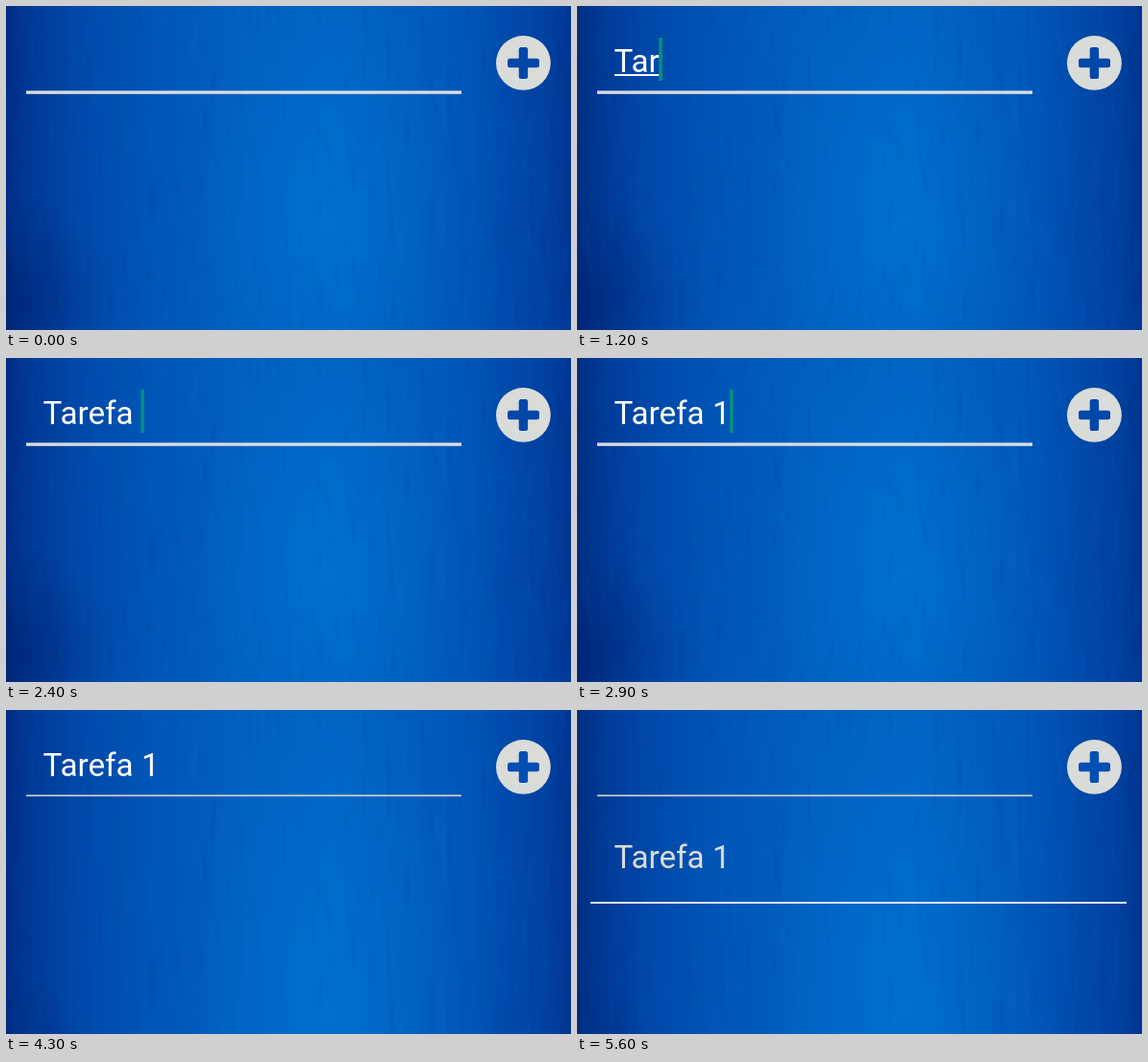
Write an HTML page with a canvas that moves like this. It is 588 px wide and 338 px high and loops after 5.7 s.

```html
<!DOCTYPE html>
<html lang="pt">
<head>
<meta charset="utf-8">
<style>
html, body { margin: 0; width: 588px; height: 338px; overflow: hidden; background: #0058b8; }
canvas { display: block; }
</style>
</head>
<body>
<canvas id="stage" width="588" height="338"></canvas>
<script>
const W = 588, H = 338, LOOP = 5700;
const FOCUS = 300, BLUR = 3400, ADD = 4500;
const TASK = 'Tarefa 1', TEXT_X = 38.5;
const KEYS = [700, 900, 1100, 1500, 1700, 1900, 2300, 2700];
const ctx = document.getElementById('stage').getContext('2d');

function seeded(seed) {
  return () => (seed = (seed * 16807) % 2147483647) / 2147483647;
}

// Brushed blue wall; `stretch` is its vertical scale.
function makeWall(stretch) {
  const canvas = document.createElement('canvas');
  canvas.width = W;
  canvas.height = H;
  const c = canvas.getContext('2d');
  c.scale(1, stretch);

  const base = c.createLinearGradient(0, 0, W, 0);
  [[0, '#002d80'], [.03, '#003692'], [.12, '#0048a8'], [.26, '#0056b7'],
   [.42, '#0060c0'], [.6, '#0064c3'], [.72, '#005dbd'], [.82, '#0056b7'],
   [.89, '#004aaa'], [.95, '#0042a1'], [1, '#003590']].forEach(([p, color]) => base.addColorStop(p, color));
  c.fillStyle = base;
  c.fillRect(0, 0, W, H);

  c.save();
  c.translate(335, 215);
  c.scale(1, 1.7);
  const glow = c.createRadialGradient(0, 0, 0, 0, 0, 140);
  glow.addColorStop(0, 'rgba(0,122,216,.5)');
  glow.addColorStop(1, 'rgba(0,122,216,0)');
  c.fillStyle = glow;
  c.fillRect(-W, -H, 2 * W, 2 * H);
  c.restore();

  const corner = c.createRadialGradient(15, 310, 0, 15, 310, 110);
  corner.addColorStop(0, 'rgba(0,20,95,.35)');
  corner.addColorStop(1, 'rgba(0,20,95,0)');
  c.fillStyle = corner;
  c.fillRect(0, 0, W, H);

  const random = seeded(71);
  for (let i = 0; i < 650; i++) {
    const x = random() * W, y = random() * (H + 60) - 60;
    const long = 20 + random() * 60, wide = 2 + random() * 5;
    const tone = random() < .5 ? '0,20,110' : '20,130,225';
    const streak = c.createLinearGradient(0, y, 0, y + long);
    streak.addColorStop(0, `rgba(${tone},0)`);
    streak.addColorStop(.5, `rgba(${tone},${.02 + random() * .035})`);
    streak.addColorStop(1, `rgba(${tone},0)`);
    c.fillStyle = streak;
    c.fillRect(x, y, wide, long);
  }
  return canvas;
}

const walls = { typing: makeWall(1), full: makeWall(1.4) };

function rect(color, x, y, w, h) {
  ctx.fillStyle = color;
  ctx.fillRect(x, y, w, h);
}

function write(text, color, x, y) {
  ctx.fillStyle = color;
  ctx.fillText(text, x, y);
}

function drawButton(plusColor) {
  ctx.fillStyle = '#d9dcd9';
  ctx.beginPath();
  ctx.arc(538.4, 59.4, 28.4, 0, 2 * Math.PI);
  ctx.fill();
  ctx.fillStyle = plusColor;
  ctx.beginPath();
  ctx.roundRect(522, 54.8, 33, 9.4, 2.5);
  ctx.roundRect(533.7, 43, 9.4, 33, 2.5);
  ctx.fill();
}

function drawInput(t) {
  const count = KEYS.filter(k => k <= t).length;
  const text = TASK.slice(0, count), before = text.slice(0, -1);
  const end = TEXT_X + ctx.measureText(text).width;
  const last = count ? KEYS[count - 1] : FOCUS;
  const focused = t >= FOCUS && t < BLUR;
  const fresh = count > 0 && t - last < 100;
  const split = TEXT_X + ctx.measureText(before).width;

  if (fresh) {
    // The newest letter settles in while the old caret fades.
    ctx.save();
    ctx.globalAlpha = .8;
    ctx.beginPath();
    ctx.rect(split, 30, 60, 50);
    ctx.clip();
    write(text, '#fff', TEXT_X, 69);
    ctx.restore();
    rect('rgba(0,145,125,.2)', split - .5, 33, 3.5, 45);
    write(before, '#fff', TEXT_X, 69);
  } else {
    write(text, '#fff', TEXT_X, 69);
  }

  // A word still being composed is underlined.
  if (count && count < 7) rect('#f4f8fc', 39, 71, end - 39, 2);
  if (focused && (t - last) % 1000 < 500) rect('#00917f', end - .5, 33, 3.5, 45);
}

function draw(now) {
  const t = now % LOOP, typing = t < BLUR;
  ctx.drawImage(typing ? walls.typing : walls.full, 0, 0);
  ctx.font = '33.2px Roboto, sans-serif';

  if (typing) rect('#d9dde0', 21, 88.4, 453, 3.4);
  else rect('#d8d6c8', 21, 88.5, 453, 1.6);
  drawButton(typing ? '#0047aa' : '#004fb2');

  if (t < ADD) {
    drawInput(t);
  } else {
    write(TASK, '#d9dcd9', TEXT_X, 165);
    rect('#f0f3f5', 14, 200.2, 558, 1.8);
  }
}

const start = performance.now();
function frame() {
  draw(performance.now() - start);
  requestAnimationFrame(frame);
}
frame();
</script>
</body>
</html>
```
